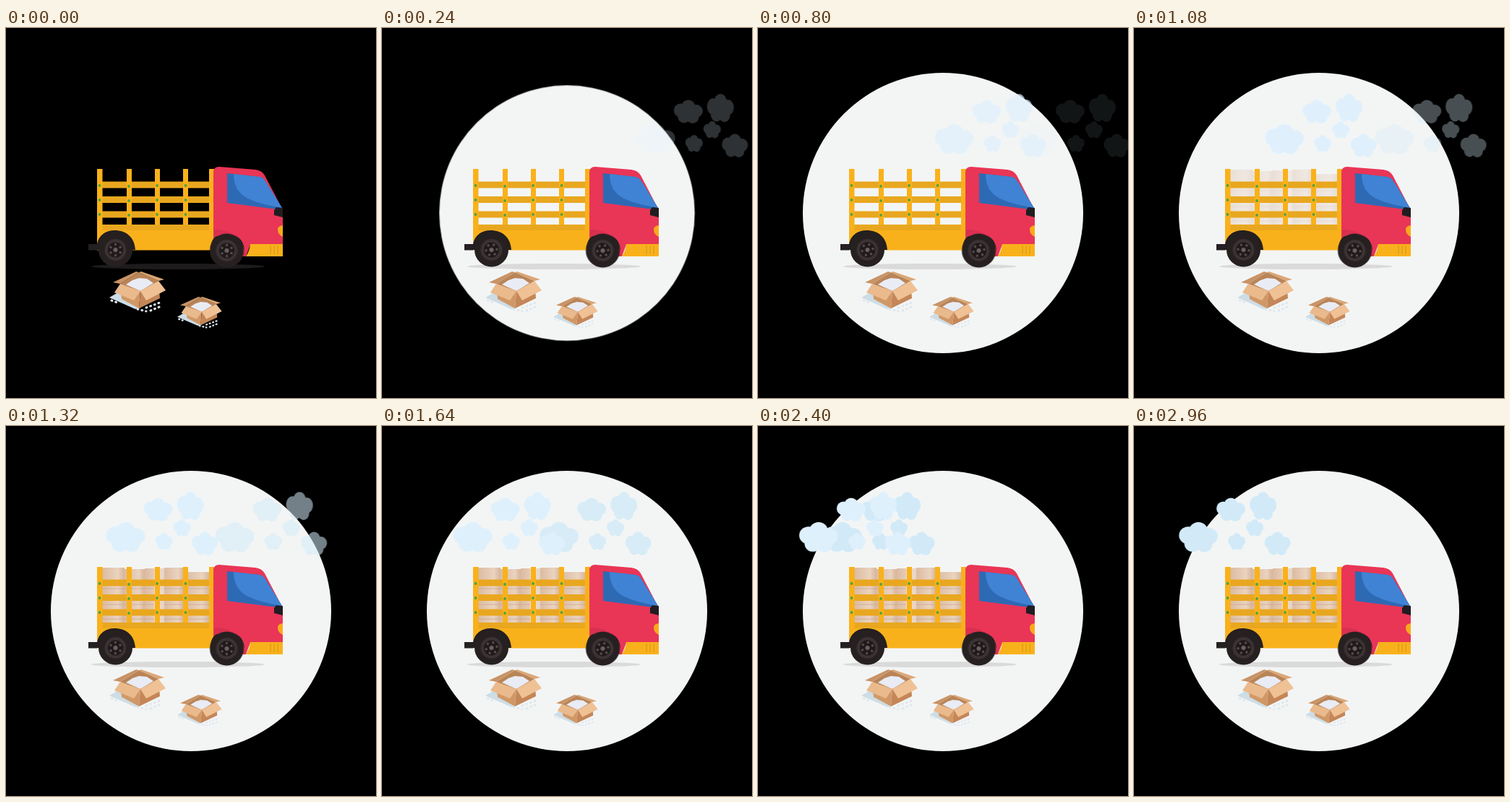
An HTML page without scripts for the animation above (3 s loop, 512 px wide and 512 px high).

```html
<!DOCTYPE html>
<html lang="en">
<head>
<meta charset="utf-8">
<title>Delivery truck</title>
<style>
html, body { margin: 0; width: 100%; height: 100%; overflow: hidden; background: #000; }
svg { display: block; width: 100vw; height: 100vh; }

.disc, .cargo, .cloud, .hub { animation: 3s linear infinite; }
.disc { fill: #f3f5f5; transform-origin: 256px 256px; animation-name: grow; }
.cargo { animation-name: load; }
.hub { animation-name: spin; animation-duration: 1s; }
.first { fill: #def0fc; animation-name: drift1, fade1; }
.second { fill: #d2eaf7; animation-name: drift2, fade2; }

@keyframes grow {
  0% { transform: scale(0); animation-timing-function: cubic-bezier(.2, .7, .3, 1); }
  16%, 100% { transform: none; }
}
@keyframes load {
  0%, 32% { opacity: 0; }
  43%, 100% { opacity: 1; }
}
@keyframes spin { to { transform: rotate(360deg); } }
@keyframes drift1 {
  0% { transform: translateX(300px); animation-timing-function: cubic-bezier(.3, 0, .31, 1); }
  90%, 100% { transform: translateX(-8px); }
}
@keyframes fade1 {
  0% { opacity: 0; }
  38%, 81% { opacity: 1; }
  95%, 100% { opacity: 0; }
}
@keyframes drift2 {
  0%, 23.3% { transform: translateX(300px); animation-timing-function: cubic-bezier(.31, 0, .48, 1); }
  100% { transform: none; }
}
@keyframes fade2 {
  0%, 23.3% { opacity: 0; }
  61%, 100% { opacity: 1; }
}
</style>
</head>
<body>
<svg viewBox="0 0 512 512">
  <defs>
    <g id="puff">
      <ellipse rx="15" ry="12"/>
      <circle cx="-10.500" cy="-2" r="9.500"/>
      <circle cx="0" cy="-7" r="9.500"/>
      <circle cx="11" cy="-1" r="9"/>
      <circle cx="6" cy="7.500" r="8.500"/>
      <circle cx="-6" cy="7" r="8.500"/>
    </g>
    <g id="puffs">
      <use href="#puff" transform="translate(89 154) scale(1.34 1.28)"/>
      <use href="#puff" transform="translate(134 116)"/>
      <use href="#puff" transform="translate(178.500 111) scale(.93 1.2)"/>
      <use href="#puff" transform="translate(167 141) scale(.6 .72)"/>
      <use href="#puff" transform="translate(142 160) scale(.6 .72)"/>
      <use href="#puff" transform="translate(198.500 163) scale(.9 1)"/>
    </g>
    <g id="wheel">
      <circle r="23.500" fill="#272021"/>
      <circle r="15" fill="#3a3132"/>
      <g class="hub">
        <circle r="11.500" fill="#1f191a" stroke="#4a4040"/>
        <circle r="7.500" fill="none" stroke="#5d5251" stroke-width="3" stroke-dasharray="2.800 5.054"/>
        <circle r="3" fill="#6d6261"/>
      </g>
    </g>
    <g id="box">
      <path d="M143 373l17-10 26 24-7 2z" fill="#cddde6"/>
      <path d="M182 389l12 3M194 387l19-7M200 391l12-5M146 377l8 3" stroke="#dfe8ee" stroke-width="3" stroke-linecap="round" stroke-dasharray="1 5"/>
      <path d="M158 354l26-16 27 12-25 15z" fill="#b98558"/>
      <path d="M166 355l9-6 9-3 11 1 9 6-18 11z" fill="#e9ecf4"/>
      <path d="M158 354l28 10-2 24-24-13z" fill="#d09867"/>
      <path d="M186 364l25-14 2 24-29 14z" fill="#c58658"/>
      <path d="M158 354l26-16-4-1-32 15z" fill="#c99365"/>
      <path d="M184 338l27 12 8-2-32-11z" fill="#dba674"/>
      <path d="M158 354l28 10-9 13-27-11z" fill="#eab98c"/>
      <path d="M186 364l25-14 10 13-27 14z" fill="#efc195"/>
    </g>
    <linearGradient id="card">
      <stop offset="0" stop-color="#dcbba1"/>
      <stop offset=".7" stop-color="#ead3bf"/>
      <stop offset="1" stop-color="#d6b59b"/>
    </linearGradient>
    <path id="rail" d="M130 0H284V9H130z" fill="#e9a71f"/>
    <g id="bolts" fill="#48a640">
      <circle cx="129.500" r="1.900"/><circle cx="170" cy="1" r="1.900"/>
      <circle cx="209" r="1.900"/><circle cx="248.500" r="1.900"/>
    </g>
  </defs>

  <circle class="disc" cx="256" cy="256" r="194"/>

  <use href="#puffs" class="cloud second"/>
  <use href="#puffs" class="cloud first"/>

  <ellipse cx="238" cy="330" rx="120" ry="4" fill="#857d7d" opacity=".22"/>

  <g class="cargo">
    <g fill="url(#card)">
      <path d="M133 196h31v77h-31z"/><path d="M164 198h28v75h-28z"/>
      <path d="M192 197h27v76h-27z"/><path d="M219 196h27v77h-27z"/>
      <path d="M246 202h36v71h-36z"/>
    </g>
    <path d="M133 225H282M133 247H282M133 267H282" stroke="#c9a68b" stroke-width="1.200" opacity=".7"/>
    <path d="M205 197h14v75h-14z" fill="#f2e3d6" opacity=".65"/>
  </g>

  <use href="#rail" y="212.500"/>
  <use href="#rail" y="233"/>
  <use href="#rail" y="253.500"/>
  <path d="M126 195h7.500v77H167v-77h7v77h32v-77h7v77h32v-77h7v77h29v-77h7V307.500H126z" fill="#f9b11b"/>
  <path d="M133.500 272H281v8H133.500z" fill="#e9a71f"/>
  <use href="#bolts" y="218"/>
  <use href="#bolts" y="238"/>
  <use href="#bolts" y="258"/>

  <path d="M114 299h12c2-12 12-19 24-19 17 0 28 10 29 27h-53v.5h-12z" fill="#241f20"/>

  <path d="M287 292V200q0-8 8-8l50 4q9 1 13 8l22 42q3 6 3 13v41h-45l-6 16h-7q-1-22-24-24z" fill="#e93556"/>
  <path d="M283 307q0-22 20-22 25 0 27 22z" fill="#241f20"/>
  <path d="M288 279q38 0 44 37h-5q-4-29-39-28z" fill="#d93050"/>
  <path d="M338 299h45v17h-51q5-7 6-17z" fill="#f9b11b"/>
  <path d="M366 301v12M371 301v12M376 301v12" stroke="#dca01e" stroke-width="1.500"/>
  <path d="M383 273q-7 1-7 6 0 7 7 10z" fill="#fba91c"/>
  <path d="M306 201l45 5q5 1 8 6l23 37v4l-6-2-70-9z" fill="#2e69b4"/>
  <path d="M315 202l36 4q5 1 8 6l23 37q-30-5-47-13-20-10-20-34z" fill="#4083d4"/>
  <path d="M374 248l9 1v13l-12-3v-7z" fill="#211d21"/>

  <use href="#wheel" x="151.500" y="307"/>
  <use href="#wheel" x="305.500" y="308"/>

  <use href="#box"/>
  <use href="#box" transform="translate(237 372) scale(.79 .77) translate(-143 -337)"/>
</svg>
</body>
</html>
```
